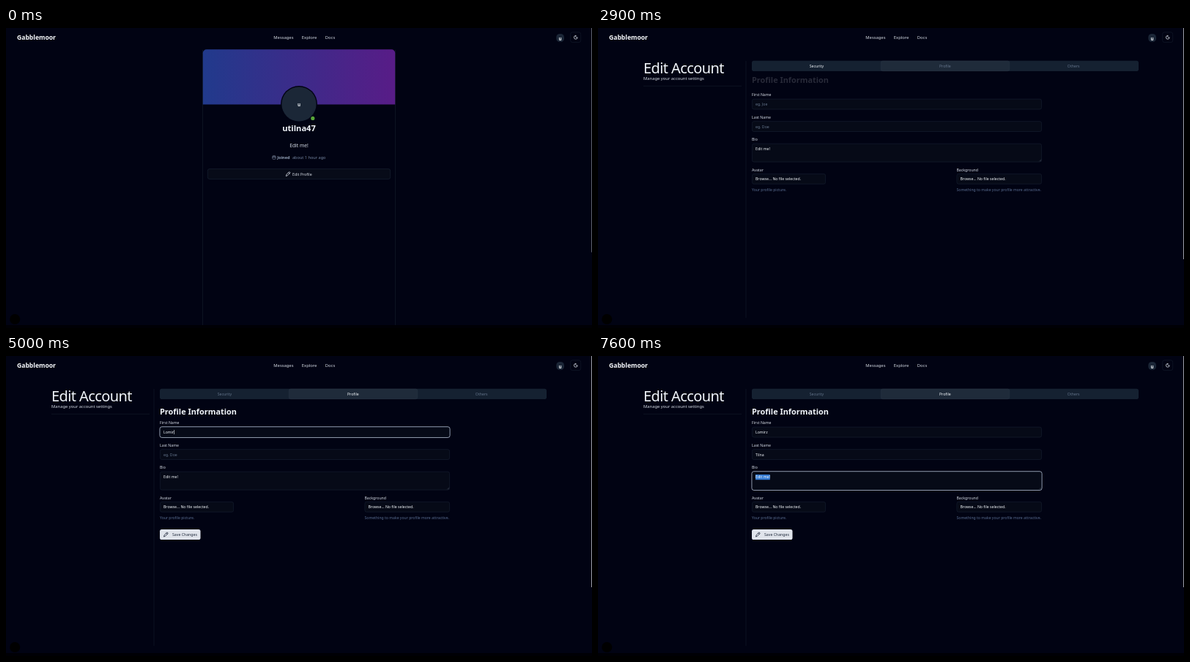
Write an HTML page with a canvas that moves like this. It is 800x410 px and loops after 8000 ms.

```html
<!DOCTYPE html>
<html lang="en">
<head>
<meta charset="utf-8">
<title>Account settings</title>
<style>
  html, body { margin: 0; width: 100%; height: 100%; overflow: hidden; background: #010313; }
  canvas { display: block; width: 800px; height: 410px; }
</style>
</head>
<body>
<canvas id="stage"></canvas>
<script>
const LOOP = 8000, W = 800, H = 410;
const FONT = '"Noto Sans", "Open Sans", sans-serif';
const BG = '#010313', LINE = '#101827', FIELD = '#060a17', FIELD_LINE = '#151e2e';
const WHITE = '#f1f5f9', SOFT = '#d5dae3', MUTED = '#64748b', HINT = '#596d91';
const USER = 'utilna47', FIRST = 'Lomirz', LAST = 'Tilna';

const canvas = document.getElementById('stage');
const ctx = canvas.getContext('2d');
const ratio = window.devicePixelRatio || 1;
canvas.width = W * ratio;
canvas.height = H * ratio;

const clamp = v => Math.max(0, Math.min(1, v));
const ramp = (t, from, to) => clamp((t - from) / (to - from));
const easeInOut = p => p * p * (3 - 2 * p);
const easeOut = p => 1 - (1 - p) ** 2;

function text(str, x, y, { size = 5.2, weight = 400, color = SOFT, align = 'left', spacing = 0 } = {}) {
  ctx.font = `${weight} ${size}px ${FONT}`;
  ctx.letterSpacing = spacing + 'px';
  ctx.textAlign = align;
  ctx.fillStyle = color;
  ctx.fillText(str, x, y);
}

function box(x, y, w, h, r, fill, stroke, lineWidth = 0.7) {
  ctx.beginPath();
  ctx.roundRect(x, y, w, h, r);
  if (fill) { ctx.fillStyle = fill; ctx.fill(); }
  if (stroke) { ctx.strokeStyle = stroke; ctx.lineWidth = lineWidth; ctx.stroke(); }
}

function rect(x, y, w, h, color) {
  ctx.fillStyle = color;
  ctx.fillRect(x, y, w, h);
}

function circle(x, y, r, fill) {
  ctx.beginPath();
  ctx.arc(x, y, r, 0, Math.PI * 2);
  ctx.fillStyle = fill;
  ctx.fill();
}

function strokePath(d, x, y, scale, color, lineWidth) {
  ctx.save();
  ctx.translate(x, y);
  ctx.scale(scale, scale);
  ctx.strokeStyle = color;
  ctx.lineWidth = lineWidth;
  ctx.lineCap = ctx.lineJoin = 'round';
  ctx.stroke(new Path2D(d));
  ctx.restore();
}

const pencil = (x, y, color) =>
  strokePath('M-3 3L-2.3 .6L1.4 -3Q2.2 -3.6 3 -2.8Q3.6 -2 3 -1.3L-.6 2.3ZM.6 -2.2L2.2 -.6', x, y, 0.86, color, 0.9);

function withAlpha(alpha, draw) {
  if (alpha <= 0) return;
  ctx.save();
  ctx.globalAlpha *= alpha;
  draw();
  ctx.restore();
}

function header() {
  text('Gabblemoor', 15, 16.2, { size: 8.6, weight: 800, color: '#f8fafc' });
  const nav = { size: 5.85, weight: 500, color: SOFT };
  text('Messages', 365.3, 15.1, nav);
  text('Explore', 403.8, 15.1, nav);
  text('Docs', 435.8, 15.1, nav);
  box(751.3, 8, 10.6, 11, 4.5, '#1b2637');
  text('u', 756.6, 16.8, { size: 6.2, weight: 700, color: WHITE, align: 'center' });
  box(770.7, 5.8, 14, 13.8, 2.5, BG, '#131b2a');
  strokePath('M0 -2.4A1.75 1.75 0 0 0 2.4 0A2.4 2.4 0 1 1 0 -2.4Z', 777.8, 12.8, 1, SOFT, 0.8);
}

function profilePage() {
  rect(268.2, 30, 0.8, 376, LINE);
  rect(531, 30, 0.8, 376, LINE);
  const banner = ctx.createLinearGradient(269, 0, 531, 0);
  banner.addColorStop(0, '#213a8c');
  banner.addColorStop(1, '#581c87');
  box(268.8, 29.3, 262.4, 75.2, [5, 5, 0, 0], banner);

  circle(400, 104, 25, BG);
  circle(400, 104, 23.6, '#1b2737');
  text('u', 400, 106.6, { size: 6.2, weight: 700, color: WHITE, align: 'center' });
  circle(418.8, 123.4, 3.4, BG);
  circle(418.8, 123.4, 2.6, '#57a639');

  text(USER, 400, 141, { size: 11.1, weight: 600, color: WHITE, align: 'center' });
  text('Edit me!', 400, 162.7, { size: 6.7, color: SOFT, align: 'center' });
  box(363.8, 175, 4.2, 4.2, 0.7, null, '#8391a8', 0.6);
  strokePath('M363.8 176.5H368M364.9 174.3V175.3M366.9 174.3V175.3', 0, 0, 1, '#8391a8', 0.6);
  text('Joined', 370.2, 179.1, { size: 5.5, weight: 600, color: '#94a3b8' });
  text('about 1 hour ago', 436.5, 179.1, { size: 5.6, color: '#7585a0', align: 'right' });

  box(275.3, 192.6, 249.4, 13.8, 2.6, '#070b18', '#182131');
  pencil(385, 199.5, SOFT);
  text('Edit Profile', 391, 201.5, { size: 5.25 });
}

function sidebar(t, height) {
  withAlpha(easeInOut(ramp(t, 1200, 1600)), () => {
    text('Edit Account', 62, 61.8, { size: 20, weight: 300, color: WHITE, spacing: -0.6 });
    text('Manage your account settings', 62, 70.7, { size: 5.83, color: SOFT });
    rect(62, 78.8, 134, 0.8, LINE);
    rect(201.6, 45, 0.8, height, LINE);
  });
}

function tabs(active, lit) {
  box(210, 44.8, 528, 14.2, 2.8, '#152131');
  box(210.5 + active * 175.7, 45.1, 175.6, 13.6, 2.5, '#1f2b3a', '#2a3747', 0.5);
  ['Security', 'Profile', 'Others'].forEach((label, i) =>
    text(label, 298.4 + i * 175.4, 53.9, { color: i === lit ? WHITE : MUTED, align: 'center' }));
}

function heading(str, progress) {
  withAlpha(progress, () =>
    text(str, 210, 79.6 - 5.5 * (1 - progress), { size: 10.9, weight: 600, color: WHITE }));
}

function caret(x, y) {
  rect(x, y - 3, 0.6, 6, WHITE);
}

function field(label, y, value, { hint = '', focus = false, height = 13.8, color = WHITE } = {}) {
  text(label, 210, y - 3.8);
  box(210.4, y + 0.2, 395.2, height, 2.5, FIELD, FIELD_LINE);
  if (focus) box(209.9, y - 0.3, 396.2, height + 1, 3, null, '#9aa4b5', 0.9);
  text(value || hint, 215, y + 9, { color: value ? color : MUTED });
  if (focus && height < 20) caret(215.2 + (value ? ctx.measureText(value).width : 0), y + 7);
}

function filePicker(label, x, width, hint) {
  text(label, x, 195.7);
  box(x + 0.4, 199.4, width - 0.8, 13.8, 2.5, FIELD, FIELD_LINE);
  text('Browse… No file selected.', x + 5, 207.5, { color: WHITE });
  text(hint, x, 222.9, { size: 5.12, color: HINT });
}

function saveButton(y, alpha) {
  withAlpha(alpha, () => {
    box(210, y, 55.5, 14, 2.6, '#e0e4eb');
    pencil(218.2, y + 7, '#0f172a');
    text('Save Changes', 227, y + 9.1, { color: '#1e293b' });
  });
}

function securityPage(t) {
  sidebar(t, 322);
  withAlpha(ramp(t, 1160, 1600) ** 1.15, () => {
    tabs(0, 0);
    field('Username', 97, USER);
    field('Email', 127.5, USER + '@velm.test');
    field('Password', 158, '*******', { color: '#8b98ad' });
  });
  heading('Authentication Information', easeOut(ramp(t, 1250, 1650)));
  saveButton(184.8, easeInOut(ramp(t, 1640, 2100)));
}

function typed(word, t, times) {
  return word.slice(0, times.filter(at => t >= at).length);
}

function infoPage(t) {
  const focus = t < 4500 ? '' : t < 5300 ? 'first' : t < 7500 ? 'last' : 'bio';
  const first = typed(FIRST, t, [4500, 4600, 4700, 4800, 4900, 5100]);
  const last = typed(LAST, t, [6000, 6100, 6100, 6300, 6500]);

  sidebar(t, 351);
  tabs(1, t < 3000 ? 0 : 1);
  heading('Profile Information', easeOut(ramp(t, 2860, 3320)));
  field('First Name', 97, first, { hint: 'eg. Joe', focus: focus === 'first' });
  field('Last Name', 127.5, last, { hint: 'eg. Doe', focus: focus === 'last' });
  field('Bio', 158, 'Edit me!', { focus: focus === 'bio', height: 24.8 });
  if (t >= 7500) {
    rect(215, 162, ctx.measureText('Edit me!').width, 7.2, '#3279d2');
    text('Edit me!', 215, 167, { color: '#fff' });
  }
  strokePath('M602.6 182L604.8 179.8M604 182L604.8 181.2', 0, 0, 1, '#5b6678', 0.4);
  filePicker('Avatar', 210, 101, 'Your profile picture.');
  filePicker('Background', 489.5, 116.5, 'Something to make your profile more attractive.');
  saveButton(237, easeInOut(ramp(t, 3150, 3700)));
}

function scrollbar(t) {
  const onProfile = t < 1100;
  withAlpha(onProfile ? 1 - ramp(t, 0, 400) : 1, () =>
    rect(799, 0, 1, onProfile ? 306.5 : 316, onProfile ? '#5d606b' : '#9b9da5'));
}

function render(t) {
  ctx.setTransform(ratio, 0, 0, ratio, 0, 0);
  rect(0, 0, W, H, BG);
  header();
  if (t < 1100) profilePage();
  else if (t < 2900) securityPage(t);
  else infoPage(t);
  rect(0, 406, W, 4, '#000005');
  circle(12.2, 398, 7, '#000');
  scrollbar(t);
}

const start = performance.now();
function tick() {
  const t = (performance.now() - start) % LOOP;
  render(Math.floor(t / 100) * 100);
  requestAnimationFrame(tick);
}
tick();
</script>
</body>
</html>
```
